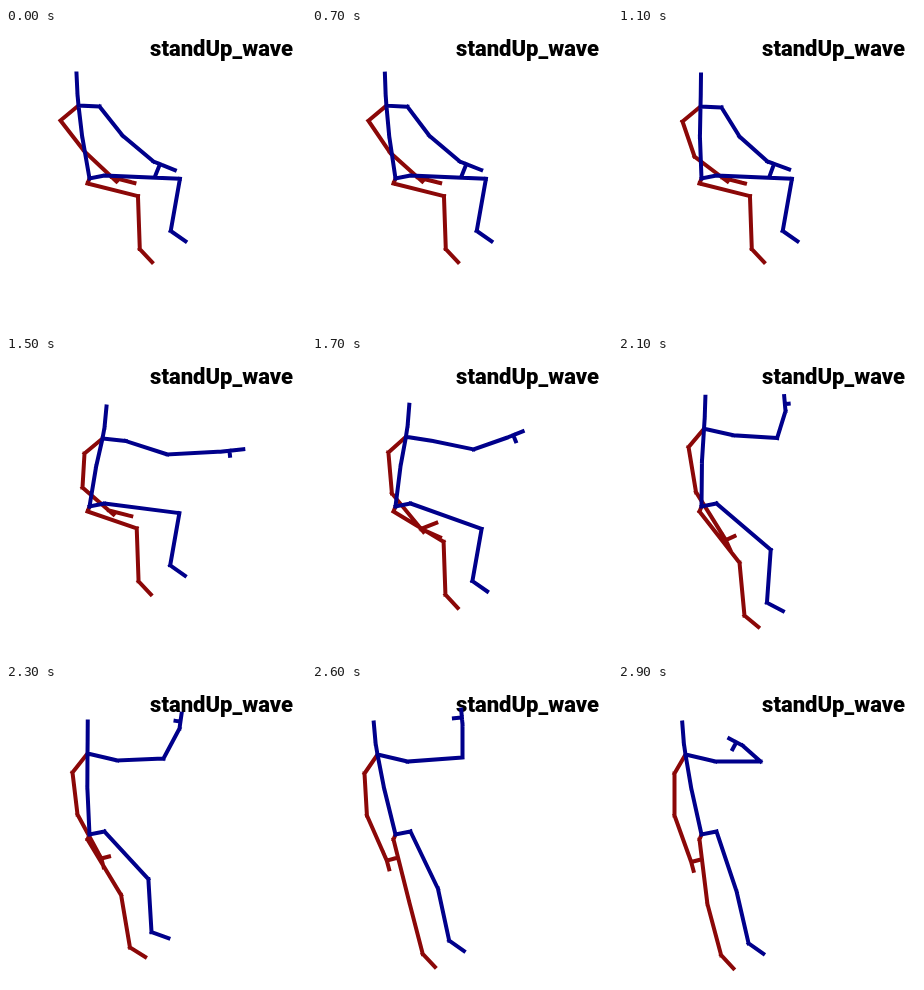
An HTML page that plays this animation: 300x300 px, repeating every 3 s.

```html
<!DOCTYPE html>
<html lang="en">
<head>
<meta charset="utf-8">
<title>standUp_wave</title>
<style>
  html, body { margin: 0; width: 100%; height: 100%; overflow: hidden; background: #fff; }
  svg { display: block; width: 100vw; height: 100vh; }
  path { fill: none; stroke-width: 4; stroke-linecap: square; }
  text { font: 900 22px Impact, Roboto, sans-serif; text-anchor: middle; }
</style>
</head>
<body>
<svg viewBox="0 0 300 300">
  <text x="215.5" y="28">standUp_wave</text>
  <g transform="translate(.5 .5)">
    <path id="right" stroke="#8b0808"/>
    <path id="left" stroke="#00008b"/>
  </g>
</svg>
<script>
const LOOP = 3000, HOLD = 700, STEP = 100;
const ROOT = [83, 150], HIP_L = [98, 147], HIP_R = [81, 155];

// Key rows start with the step number.
const neckPath = curve(
  [0, 72, 77], [5, 82, 78], [9, 96, 82], [13, 89, 77], [17, 81, 69], [20, 65, 70], [23, 67, 70]);

// How far the legs have straightened, 0 sitting to 1 standing.
const rise = curve([5, 0], [9, .07], [13, .46], [17, .65], [18, .8], [23, 1]);

// Waving arm: elbow, wrist, hand angle, thumb length to one side.
const wave = curve(
  [0, 116, 107, 147, 133, 22, 11],
  [5, 121, 108, 149, 133, 20, 12],
  [9, 161, 98, 216, 95, -6, 5],
  [12, 161, 91, 178, 75, -35, 8],
  [13, 160, 90, 161, 69, -108, 11],
  [17, 157, 74, 173, 44, -82, -5],
  [20, 150, 73, 150, 40, -95, -8],
  [23, 142, 77, 124, 61, -152, -8]);

// Hanging arm: upper arm and forearm as offsets.
const hang = curve(
  [0, 24, 31, 32, 30], [5, 12, 35, 33, 25], [9, -2, 34, 31, 27],
  [13, 9, 48, 32, 49], [17, 5, 42, 20, 37], [23, 0, 42, 14, 39]);

// Smooth curve through the key rows, without overshoot.
function curve(...rows) {
  const last = rows.length - 1;
  const rate = (k, i) => (rows[k + 1][i] - rows[k][i]) / (rows[k + 1][0] - rows[k][0]);
  const slope = (k, i) => {
    if (k === 0) return rate(0, i);
    if (k === last) return rate(last - 1, i);
    const a = rate(k - 1, i), b = rate(k, i);
    return a * b > 0 ? 2 * a * b / (a + b) : 0;
  };
  return step => {
    if (step <= rows[0][0]) return rows[0].slice(1);
    let k = 0;
    while (k < last - 1 && step >= rows[k + 1][0]) k++;
    const span = rows[k + 1][0] - rows[k][0], u = (step - rows[k][0]) / span;
    return rows[k].map((v, i) => v + (rows[k + 1][i] - v) * u * u * (3 - 2 * u) +
      span * u * (1 - u) * ((1 - u) * slope(k, i) - u * slope(k + 1, i))).slice(1);
  };
}

function ease(step, from, to) {
  const u = Math.min(1, Math.max(0, (step - from) / (to - from)));
  return u * u * (3 - 2 * u);
}

const add = ([x, y], dx, dy) => [x + dx, y + dy];

function polar(p, deg, len) {
  const a = deg * Math.PI / 180;
  return add(p, len * Math.cos(a), len * Math.sin(a));
}

// One separate stroke per bone, so that the square ends show at joints.
function chain(...pts) {
  return pts.slice(1).map((p, i) => `M${pts[i]}L${p}`).join('');
}

function body(neck) {
  const [x, y] = neck, tilt = (x - 80) / 4;
  const spine = [x + (ROOT[0] - x) * .42 - 1, y + (ROOT[1] - y) * .42];
  return chain(add(neck, tilt, -32), add(neck, tilt / 2, -11), neck, spine, ROOT);
}

function armL(step, neck) {
  const [ex, ey, wx, wy, angle, side] = wave(step);
  const turn = ease(step, 5, 17);
  const shoulder = add(neck, 21 + 9 * turn, 1 + 6 * turn);
  const wrist = [wx, wy], palm = polar(wrist, angle, 7);
  const tip = polar(palm, angle, 16 - 8 * ease(step, 7, 13));
  return chain(neck, shoulder, [ex, ey], wrist, palm, tip) +
    chain(palm, polar(palm, angle + 90, side));
}

function armR(step, neck) {
  const [ux, uy, fx, fy] = hang(step);
  const turn = ease(step, 9, 17);
  const shoulder = add(neck, -18 + 3 * turn + 4 * ease(step, 17, 23), 15 + 4 * turn);
  const elbow = add(shoulder, ux, uy), wrist = add(elbow, fx, fy);
  const reach = (14 * turn - 6) / Math.hypot(fx, fy);
  const palm = add(wrist, fx * reach, fy * reach);
  const angle = 14 + 61 * turn;
  const tip = polar(palm, angle, 23 - 14 * turn);
  const thumb = polar(palm, angle - 90 * ease(step, 9, 13), 18 - 10 * turn);
  return chain(neck, shoulder, elbow, wrist, palm, tip) + chain(palm, thumb);
}

function leg(hip, thigh, length, shin, foot) {
  const knee = polar(hip, thigh, length), ankle = polar(knee, shin, 53);
  return chain(ROOT, hip, knee, ankle, polar(ankle, foot, 18));
}

const left = document.getElementById('left');
const right = document.getElementById('right');

function draw(ms) {
  const t = ms % LOOP;
  const step = t < HOLD ? 0 : Math.floor((t - HOLD) / STEP) + 1;
  const neck = neckPath(step), [up] = rise(step);
  const swing = ease(step, 12, 21);
  const roll = 15 * ease(step, 13, 17) * (1 - ease(step, 17, 20));
  right.setAttribute('d', armR(step, neck) +
    leg(HIP_R, 14 + 69 * up, 52 + 13 * ease(step, 9, 13), 88 - 13 * swing, 47 - roll));
  left.setAttribute('d', body(neck) + armL(step, neck) +
    leg(HIP_L, 2.5 + 69 * up, 75.5 - 12 * ease(step, 13, 18), 100 - 23 * swing, 35 - roll));
}

const start = performance.now();
function tick() {
  draw(performance.now() - start);
  requestAnimationFrame(tick);
}
tick();
</script>
</body>
</html>
```
